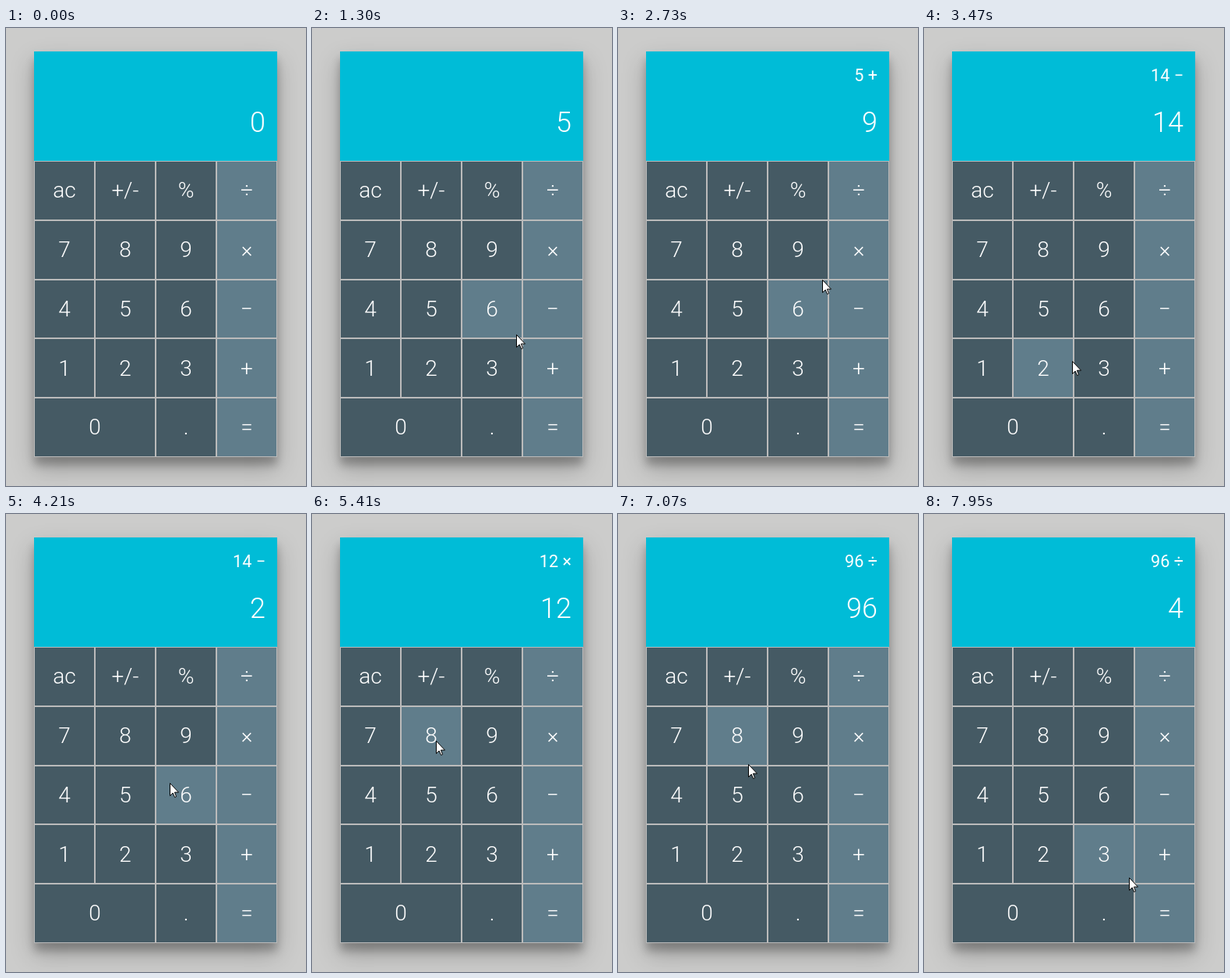
Write an HTML page that moves like this. It is 385x586 px and loops after 8 s.

```html
<!DOCTYPE html>
<html lang="en">
<head>
<meta charset="utf-8">
<title>Calculator</title>
<style>
html, body { margin: 0; width: 100%; height: 100%; overflow: hidden; background: #cccccb; }
body { position: relative; font-family: Roboto, sans-serif; font-weight: 300; color: #fff; }
#calculator {
  position: absolute; left: 36px; top: 30px; width: 312px; height: 519px;
  box-shadow: 0 14px 28px rgba(0,0,0,.25), 0 10px 10px rgba(0,0,0,.22);
}
#screen { position: relative; height: 140px; background: #00bcd7; }
#screen div { position: absolute; right: 15px; white-space: pre; }
#history { top: 18px; font-size: 21.6px; font-weight: 400; line-height: 26px; }
#value { top: 70px; font-size: 36px; line-height: 42px; }
#keys { display: grid; grid-template: repeat(5, 75.8px) / repeat(4, 78px); }
.key {
  box-sizing: border-box; border: 1px solid #bbb; padding-top: .2px; background: #455a64;
  font-size: 28px; line-height: 74px; text-align: center;
}
.wide { grid-column: span 2; }
.operator, .hover { background: #607d8b; }
.operator.hover, .pressed { background: #78909c; }
.operator.pressed { background: #90a4ae; }
#cursor { position: absolute; left: 0; top: 0; overflow: visible; }
</style>
</head>
<body>
<div id="calculator">
  <div id="screen"><div id="history"></div><div id="value"></div></div>
  <div id="keys"></div>
</div>
<svg id="cursor" width="12" height="19">
  <path d="M.5 .5V16.5L4.2 13 6.6 18.5 8.6 17.6 6.4 12.1H11.5Z" fill="#fff" stroke="#000" stroke-linejoin="bevel"/>
</svg>
<script>
const LOOP = 8000, PRESS_DELAY = 130, RELEASE_DELAY = 260;
const LEFT = 36, TOP = 170, KEY_WIDTH = 78, KEY_HEIGHT = 75.8;
const labels = 'ac +/- % ÷ 7 8 9 × 4 5 6 − 1 2 3 + 0 0 . ='.split(' ');
const operators = {
  '+': (a, b) => a + b, '−': (a, b) => a - b, '×': (a, b) => a * b, '÷': (a, b) => a / b
};
const byId = id => document.getElementById(id);
const [keyBox, historyBox, valueBox, cursor] = ['keys', 'history', 'value', 'cursor'].map(byId);

// The wide 0 fills two cells of the label grid
const keys = [...new Set(labels)].map(label => {
  const key = document.createElement('div');
  key.className = 'key';
  key.classList.toggle('operator', label in operators || label === '=');
  key.classList.toggle('wide', label === '0');
  key.textContent = label;
  return keyBox.appendChild(key);
});

// Pointer moves: key, departure, arrival, sideways bow relative to the distance
const moves = [
  ['5', 60, 760, 0], ['+', 1060, 1483, -.127], ['9', 1760, 2140, 0],
  ['−', 2560, 2975, .055], ['2', 3250, 3560, 0], ['×', 3845, 4600, -.158],
  ['8', 4910, 5410, 0], ['÷', 5960, 6380, 0], ['4', 6645, 7350, -.034],
  ['=', 7710, 8071, -.072]
].map(([label, depart, arrive, bow]) => ({ label, depart, arrive, bow }));

function aimAt(label) {
  const cell = labels.indexOf(label);
  return [
    LEFT + (cell % 4 + .5) * KEY_WIDTH + 6,
    TOP + (Math.floor(cell / 4) + .5) * KEY_HEIGHT + 6
  ];
}

function pointer(time) {
  let x = 278, y = 590;
  for (const { label, depart, arrive, bow } of moves) {
    if (time < depart) break;
    const [toX, toY] = aimAt(label), dx = toX - x, dy = toY - y;
    const u = Math.min(1, (time - depart) / (arrive - depart));
    const ease = u * u * (3 - 2 * u), side = bow * 4 * ease * (1 - ease);
    x += dx * ease - dy * side;
    y += dy * ease + dx * side;
  }
  return [x, y];
}

function labelAt(x, y) {
  const col = Math.floor((x - LEFT) / KEY_WIDTH), row = Math.floor((y + .7 - TOP) / KEY_HEIGHT);
  return col >= 0 && col < 4 ? labels[row * 4 + col] : undefined;
}

function calculate(time) {
  let value = 0, total = 0, operator = '';
  for (const { label, arrive } of moves) {
    if (time < arrive + RELEASE_DELAY) break;
    if (label in operators) {
      total = value = operator ? operators[operator](total, value) : value;
      operator = label;
    } else value = Number(label);
  }
  return { value, history: operator && `${total} ${operator}` };
}

function draw(now) {
  const time = now % LOOP, [x, y] = pointer(time);
  const { value, history } = calculate(time);
  historyBox.textContent = history;
  valueBox.textContent = value;
  cursor.style.transform = `translate(${Math.round(x)}px, ${Math.round(y)}px)`;

  const hovered = labelAt(x, y);
  const down = moves.some(({ arrive }) =>
    time >= arrive + PRESS_DELAY && time < arrive + RELEASE_DELAY);
  for (const key of keys) {
    const hover = key.textContent === hovered;
    key.classList.toggle('hover', hover);
    key.classList.toggle('pressed', hover && down);
  }
}

const start = performance.now();
function tick() {
  draw(performance.now() - start);
  requestAnimationFrame(tick);
}
tick();
</script>
</body>
</html>
```
